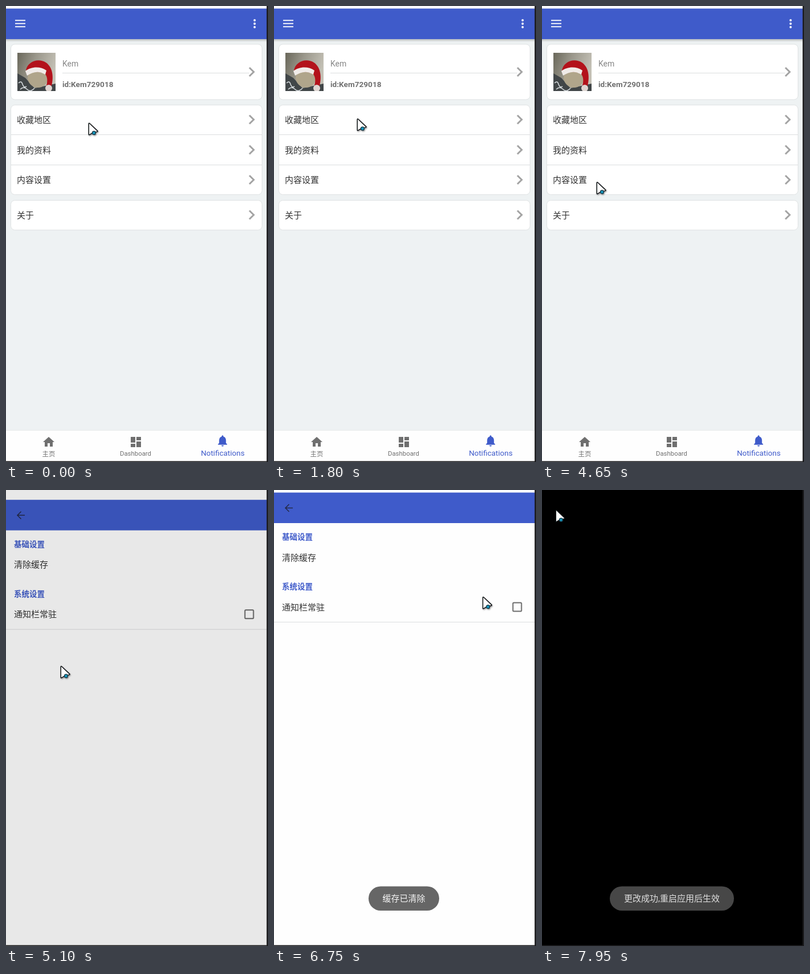
An HTML page for the animation above (8 s loop, 460x799 px).

```html
<!DOCTYPE html>
<html lang="zh-CN">
<head>
<meta charset="utf-8">
<title>Settings demo</title>
<style>
  html, body { margin: 0; width: 100%; height: 100%; overflow: hidden; background: #000; }
  svg { display: block; width: 460px; height: 799px; }
  text { font-family: Roboto, "Noto Sans CJK SC", "Noto Sans CJK", sans-serif; font-size: 15px; fill: #333; }
  .bar { fill: #3f5bca; }
  .head { font-size: 13.5px; font-weight: 700; fill: #3f5bca; }
  .card { fill: #fff; stroke: #dfe2e3; }
  .rule { stroke: #dcdedf; }
  .chev { fill: none; stroke: #a3a3a3; stroke-width: 3; }
  .nav { fill: #6f6f6f; text-anchor: middle; }
  .nav text { font-size: 11.4px; fill: #707070; }
  .nav .on { fill: #3f5bca; }
  .toast text { text-anchor: middle; }
</style>
</head>
<body>
<svg viewBox="0 0 460 799" xmlns="http://www.w3.org/2000/svg">
  <defs>
    <path id="chev" class="chev" d="M-4 -7.5L3.6 0L-4 7.5"/>
    <linearGradient id="wall" x2="1" y2=".35">
      <stop stop-color="#69675a"/><stop offset=".45" stop-color="#99968a"/><stop offset="1" stop-color="#c4c1b6"/>
    </linearGradient>
    <linearGradient id="fade" x2="0" y2="1">
      <stop stop-color="#000" stop-opacity=".22"/><stop offset="1" stop-color="#000" stop-opacity="0"/>
    </linearGradient>
    <clipPath id="photo"><rect width="67" height="67"/></clipPath>
    <filter id="soft" x="-50%" y="-50%" width="200%" height="200%">
      <feDropShadow dx="1" dy="1.5" stdDeviation="1.2" flood-opacity=".4"/>
    </filter>
  </defs>
  <rect width="460" height="799"/>

  <g id="home">
    <rect width="460" height="799" fill="#eef2f3"/>
    <rect width="460" height="5" fill="#fefefe"/>
    <rect class="bar" y="4.5" width="460" height="53.5"/>
    <rect y="58" width="460" height="5" fill="url(#fade)"/>
    <path d="M16 25.2H34M16 30.7H34M16 36.2H34" stroke="#f4f6fc" stroke-width="2"/>
    <g fill="#fff"><circle cx="436.5" cy="25" r="2"/><circle cx="436.5" cy="31" r="2"/><circle cx="436.5" cy="37" r="2"/></g>

    <rect class="card" x="8.5" y="67" width="441" height="97" rx="7"/>
    <rect class="card" x="8.5" y="173.5" width="441" height="157" rx="7"/>
    <rect class="card" x="8.5" y="340.5" width="441" height="52" rx="7"/>
    <path class="rule" d="M99 117.5H427M9 225.5H449M9 278.5H449"/>

    <g transform="translate(20 82)" clip-path="url(#photo)">
      <rect width="67" height="67" fill="url(#wall)"/>
      <path d="M0 36L14 44L30 62L67 54V67H0Z" fill="#414648"/>
      <ellipse cx="36" cy="43" rx="18" ry="18" fill="#b0a58b"/>
      <path d="M15 31C17 16 36 8 50 17C62 25 64 42 60 58L51 57C54 47 52 40 47 35Z" fill="#b3121b"/>
      <path d="M14 32C24 24 40 23 51 31L49 38C38 31 27 33 17 40Z" fill="#f0ebe8"/>
      <circle cx="55" cy="62" r="6" fill="#dfd6d2"/>
      <path d="M2 53q5-5 7 2t7 4M5 64q6-6 12 0t13-2" fill="none" stroke="#d8dde0" stroke-width="1.5"/>
    </g>
    <text x="99" y="106" style="font-size:14px;fill:#868686">Kem</text>
    <text x="99" y="142" style="font-size:13.6px;font-weight:700;fill:#707070">id:Kem729018</text>
    <g id="rows"></g>

    <rect y="744" width="460" height="55" fill="#fefefe"/>
    <path d="M0 743.5H460" stroke="#e6e9ea"/>
    <g class="nav">
      <path transform="translate(63 752)" d="M10 20v-6h4v6h5v-8h3L12 3 2 12h3v8z"/>
      <text x="75" y="788.5">主页</text>
      <path transform="translate(216 752)" d="M3 13h8V3H3zM3 21h8v-6H3zM13 21h8V11h-8zM13 3v6h8V3z"/>
      <text x="227.5" y="788">Dashboard</text>
      <path class="on" transform="translate(368.2 749.7)" d="M12 22c1.1 0 2-.9 2-2h-4c0 1.1.9 2 2 2zm6-6v-5c0-3.07-1.64-5.64-4.5-6.32V4a1.5 1.5 0 0 0-3 0v.68C7.63 5.36 6 7.92 6 11v5l-2 2v1h16v-1z"/>
      <text class="on" x="380.5" y="788" style="font-size:13.5px">Notifications</text>
    </g>
  </g>

  <g id="prefs">
    <rect y="-80" width="460" height="880" fill="#fefefe"/>
    <rect class="bar" y="4.5" width="460" height="53.5"/>
    <path d="M33 31.5H20M26.5 25L20 31.5L26.5 38" fill="none" stroke="#252b4a" stroke-width="1.6"/>
    <text class="head" x="14" y="87.3">基础设置</text>
    <text x="14" y="123.7">清除缓存</text>
    <text class="head" x="14" y="174.3">系统设置</text>
    <text x="14" y="210.7">通知栏常驻</text>
    <path class="rule" d="M0 231.5H460"/>
    <rect id="box" x="419.5" y="197.5" width="15" height="15" rx="1.5" stroke-width="2"/>
    <path id="tick" d="M421.5 205.2L425.3 209L432.5 201.5" fill="none" stroke="#fff" stroke-width="2"/>
  </g>

  <g id="cleared" class="toast">
    <rect x="166" y="694.5" width="124" height="42.5" rx="21.2" fill="#666"/>
    <text x="228" y="721.3" style="fill:#f4f4f4">缓存已清除</text>
  </g>
  <g id="changed" class="toast">
    <rect x="119" y="694.5" width="218" height="42.5" rx="21.2" fill="#474747"/>
    <text x="228" y="721.3" style="fill:#dedede">更改成功,重启应用后生效</text>
  </g>

  <path d="M457.6 0H460V799H0V797.6H457.6Z" fill="#1c1c1e"/>

  <g id="cursor" filter="url(#soft)">
    <path d="M0 0V19L5.5 15.8L14.2 13.4Z" fill="#fff" stroke="#101214" stroke-width="3" stroke-linejoin="round" paint-order="stroke"/>
    <circle cx="8.4" cy="16.4" r="3" fill="#1496bd" stroke="#17333f" stroke-width="1.2"/>
  </g>
</svg>
<script>
  const LOOP = 8000, STEP = 150;
  const OPEN = 4950, CLEAR = 6300, CHECK = 7050, EXIT = 7950;
  const $ = id => document.getElementById(id);

  const rows = [['收藏地区', 199], ['我的资料', 252], ['内容设置', 304.5], ['关于', 366]];
  $('rows').innerHTML = '<use href="#chev" x="431.3" y="115.5"/>' + rows.map(([label, y]) =>
    `<text x="19" y="${y + 5.7}">${label}</text><use href="#chev" x="431.3" y="${y}"/>`).join('');

  // time, x, y
  const path = [
    [0, 146, 206], [1800, 147, 198.5], [2400, 147, 198.5], [3300, 94.5, 159.5], [3600, 94.5, 159.5],
    [4500, 97, 309.5], [5250, 97, 309.5], [5950, 67, 125], [6300, 67, 125],
    [6900, 423, 200], [7100, 423, 200], [7600, 25, 36], [8000, 25, 36]
  ];
  // time, vertical offset, opacity
  const enter = [[OPEN, 45, .35], [5100, 12.7, .915], [5250, 0, 1]];

  const smooth = k => k * k * (3 - 2 * k);

  function at(keys, t, ease = k => k) {
    if (t <= keys[0][0]) return keys[0].slice(1);
    const i = keys.findIndex(k => k[0] > t);
    if (i < 0) return keys[keys.length - 1].slice(1);
    const a = keys[i - 1], b = keys[i];
    const k = ease((t - a[0]) / (b[0] - a[0]));
    return [1, 2].map(n => a[n] + (b[n] - a[n]) * k);
  }

  const show = (id, on) => { $(id).style.display = on ? '' : 'none'; };

  function draw(time) {
    const t = Math.floor((time % LOOP) / STEP) * STEP;
    const checked = t >= CHECK, dark = t >= EXIT;
    const [x, y] = at(path, t, smooth);
    const [dy, alpha] = at(enter, t);

    show('home', t < OPEN);
    show('prefs', t >= OPEN && !dark);
    $('prefs').setAttribute('transform', `translate(0 ${dy})`);
    $('prefs').setAttribute('opacity', alpha);
    $('box').setAttribute('fill', checked ? '#3f5bca' : 'none');
    $('box').setAttribute('stroke', checked ? '#3f5bca' : '#6b6b6b');
    show('tick', checked);
    show('cleared', t >= CLEAR && !dark);
    $('cleared').setAttribute('opacity', t < CLEAR + STEP ? .6 : 1);
    show('changed', dark);
    $('cursor').setAttribute('transform', `translate(${x} ${y})`);
  }

  const start = performance.now();
  function tick() {
    draw(performance.now() - start);
    requestAnimationFrame(tick);
  }
  tick();
</script>
</body>
</html>
```
